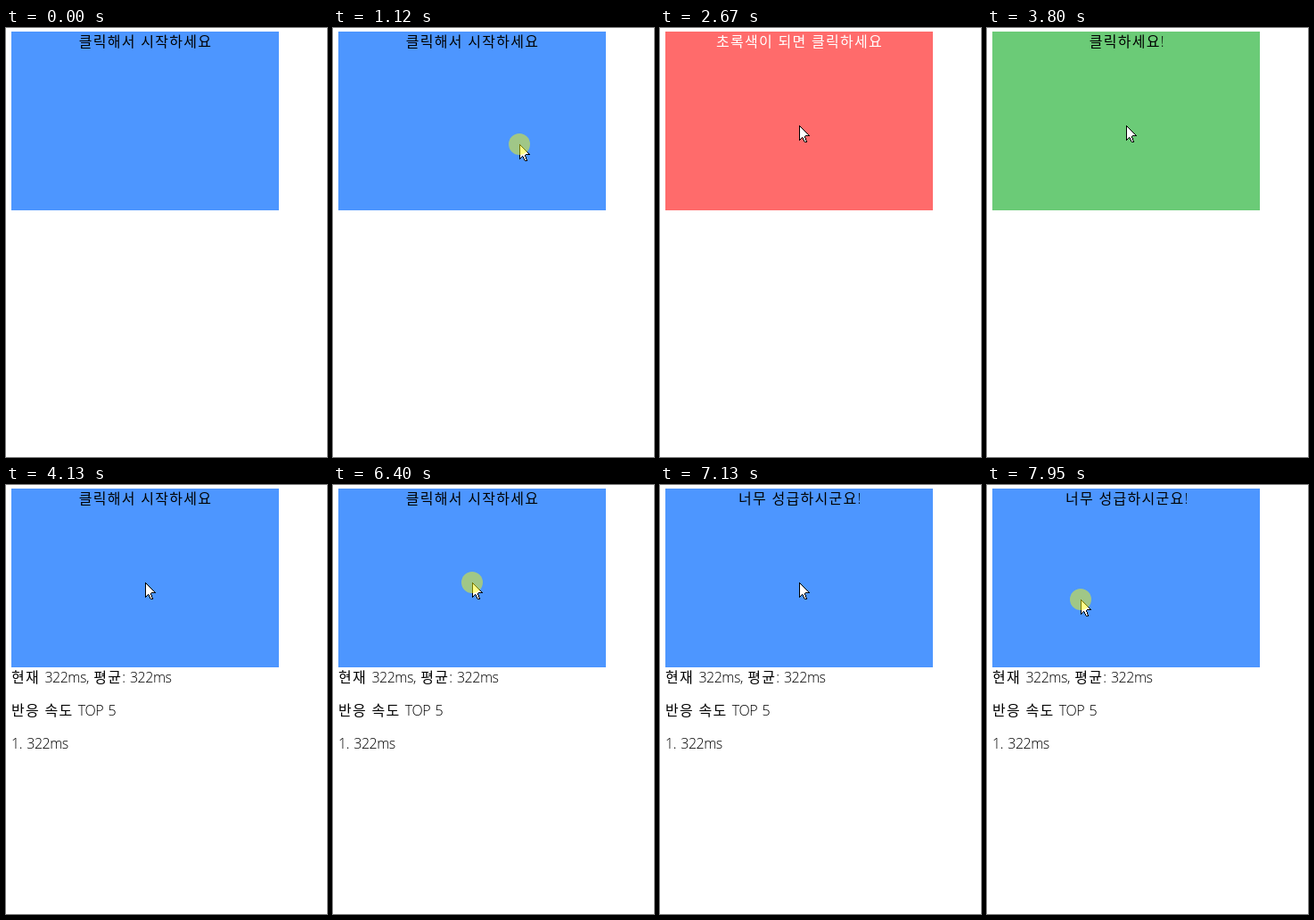
These frames come from a looping animation (360 by 480 pixels, 8000 ms). An HTML page:

```html
<!DOCTYPE html>
<html lang="ko">
<head>
<meta charset="utf-8">
<title>반응 속도 테스트</title>
<style>
  html, body { margin: 0; width: 100%; height: 100%; overflow: hidden; background: #fff; }
  svg { display: block; }
  text { font: 350 16px "Open Sans", "Noto Sans", sans-serif; letter-spacing: -.5px; word-spacing: 1.75px; }
  .ko { font-family: "Noto Sans CJK KR", "Noto Sans CJK", sans-serif; letter-spacing: 1.28px; }
</style>
</head>
<body>
<svg width="360" height="480" viewBox="0 0 360 480">
  <rect id="screen" x="6" y="4" width="300" height="200"/>
  <text id="message" x="156.5" y="21" text-anchor="middle"></text>
  <g id="results">
    <text x="6" y="221">현재 322ms, 평균: 322ms</text>
    <text x="6" y="258">반응 속도 TOP 5</text>
    <text x="6" y="295">1. 322ms</text>
  </g>
  <g id="pointer">
    <path d="M.5 .5V16.5L3.5 13.5L6.5 18.5H8.5L6.5 12.5L7.5 11.5H11.5Z" fill="#fff" stroke="#000" shape-rendering="crispEdges"/>
    <circle id="press" r="12" fill="#ff0" fill-opacity=".47"/>
  </g>
</svg>
<script>
const LOOP = 8000;
const $ = id => document.getElementById(id);

const states = {
  waiting: { fill: '#4d96ff', ink: '#000', label: '클릭해서 시작하세요' },
  ready: { fill: '#ff6b6b', ink: '#fff', label: '초록색이 되면 클릭하세요' },
  now: { fill: '#6bcb77', ink: '#000', label: '클릭하세요!' },
  hasty: { fill: '#4d96ff', ink: '#000', label: '너무 성급하시군요!' }
};

// A state begins at `at`; when a click causes it, the button goes down at `press`
const timeline = [
  { at: 0, state: 'waiting' },
  { at: 1180, state: 'ready', press: 1120 },
  { at: 3800, state: 'now' },
  { at: 4130, state: 'waiting', press: 4060, scored: true },
  { at: 6480, state: 'ready', press: 6400 },
  { at: 7130, state: 'hasty', press: 7070 },
  { at: LOOP, state: 'waiting', press: 7950 }
];
const resultsAt = timeline.find(e => e.scored).at;

// Each move starts where the one before ended; `via` bends its path
const entry = [264, 371];
const moves = [
  { start: 380, end: 790, steps: 6, to: [209, 130] },
  { start: 1510, end: 2190, steps: 10, to: [166, 95], via: [110, 115] },
  { start: 2390, end: 2670, steps: 5, to: [156, 109] },
  { start: 7330, end: 7540, steps: 4, to: [87, 131] },
  { start: 7690, end: 7950, steps: 4, to: [105, 128] }
];

const easeOut = p => 1 - (1 - p) ** 2;

function bend(a, via, b, p) {
  return a.map((v, i) => {
    const mid = via ? via[i] : (v + b[i]) / 2;
    return Math.round(v * (1 - p) ** 2 + 2 * mid * p * (1 - p) + b[i] * p * p);
  });
}

function pointerAt(t) {
  const index = moves.findLastIndex(m => t >= m.start);
  if (index < 0) return null;
  const { start, end, steps, to, via } = moves[index];
  const from = index ? moves[index - 1].to : entry;
  const step = Math.floor((t - start) / (end - start) * (steps - 1) + 0.01) + 1;
  const p = Math.min(1, step / steps);
  return bend(from, via, to, via ? p : easeOut(p));
}

const markHangul = s => s.replace(/[가-힣]+/g, '<tspan class="ko">$&</tspan>');
const show = (id, on) => $(id).setAttribute('visibility', on ? 'visible' : 'hidden');

let shown;
function setState(name) {
  if (name === shown) return;
  shown = name;
  const { fill, ink, label } = states[name];
  $('screen').setAttribute('fill', fill);
  $('message').setAttribute('fill', ink);
  $('message').innerHTML = markHangul(label);
}

function draw(t) {
  const tip = pointerAt(t);
  setState(timeline.findLast(e => t >= e.at).state);
  show('results', t >= resultsAt);
  show('press', timeline.some(e => t >= e.press && t < e.at));
  show('pointer', tip);
  if (tip) $('pointer').setAttribute('transform', `translate(${tip})`);
}

for (const line of $('results').children) line.innerHTML = markHangul(line.textContent);

const began = performance.now();
function tick() {
  draw((performance.now() - began) % LOOP);
  requestAnimationFrame(tick);
}
tick();
</script>
</body>
</html>
```
